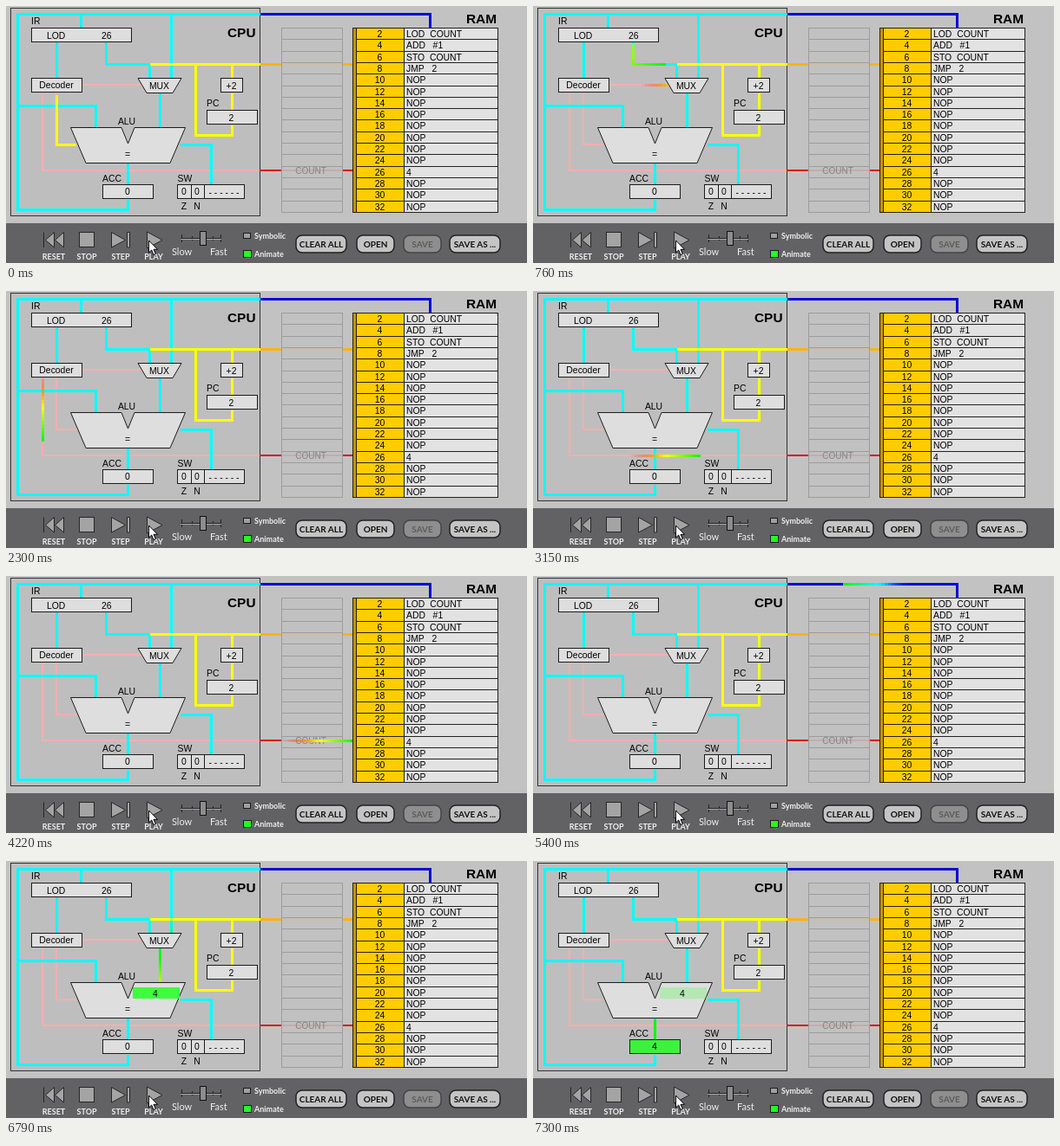
These frames come from a looping animation (600 by 297 pixels, 7.66 s). An HTML page:

```html
<!DOCTYPE html>
<html lang="en">
<head>
<meta charset="utf-8">
<title>CPU simulator</title>
<style>
html, body { margin: 0; width: 100%; height: 100%; overflow: hidden; background: #c2c2c2; }
svg { display: block; width: 600px; height: 297px; font: 10.4px "Liberation Sans", Arial, sans-serif; }
.crisp, .wire, .pulse { shape-rendering: crispEdges; }
.wire, .pulse { fill: none; stroke-width: 3; transform: translate(.5px, .5px); }
.thin { stroke-width: 2; transform: none; }
.box { fill: #dedede; stroke: #1c1c1c; }
.mid { text-anchor: middle; }
.big { font-weight: bold; font-size: 15.4px; }
.dashes { letter-spacing: 2.8px; }
.ui { font-family: Lato, sans-serif; fill: #eee; }
.speed { font-size: 11px; }
.cap { font-size: 9px; font-weight: bold; }
.icon { fill: #a4a4a4; stroke: #262626; }
</style>
</head>
<body>
<svg viewBox="0 0 600 297">
  <rect width="600" height="297" fill="#c2c2c2"/>
  <g class="crisp">
    <rect x="5.5" y="2.5" width="287" height="240" fill="#bebebe" stroke="#333"/>
  </g>
  <g id="wires"></g>
  <g id="ports" class="crisp"></g>
  <text class="mid" x="351" y="194" fill="#858585" font-size="10">COUNT</text>
  <g id="pulses"></g>

  <g id="boxes" class="crisp"></g>
  <path class="box" d="M152 83.5H202L192 100.5H162Z"/>
  <path class="box" d="M74.5 140.5H133L140.5 159L148 140.5H206.5L189 181.5H92Z"/>
  <g id="sum">
    <rect id="glow" x="146" y="146" width="54" height="13" fill="#3f3"/>
    <text class="mid" x="172" y="157">4</text>
  </g>
  <g id="labels"></g>
  <text id="acc" class="mid" x="140" y="218">0</text>
  <g id="ram"></g>

  <rect class="crisp" y="251" width="600" height="46" fill="#626264"/>
  <g class="icon">
    <path d="M43.5 261.500V279M55.500 261.500V279L45.500 270.500ZM66.500 261.500V279L56.500 270.500Z"/>
    <rect x="84.500" y="261.500" width="17" height="17"/>
    <path d="M121.500 261.500V279L137.500 270.500ZM139.500 261.500H142.500V279H139.500Z"/>
    <path d="M162.500 261V280L180 270.500Z"/>
  </g>
  <g class="crisp">
    <path d="M201 268.500H248M202.500 264V273M214.500 266V271M238.500 266V271M247.500 264V273" stroke="#222"/>
    <path d="M201 269.500H248" stroke="#aaa"/>
    <rect x="223.500" y="260.500" width="7" height="16" fill="#8c8c8c" stroke="#111"/>
    <rect x="273.500" y="262.500" width="8" height="6" fill="#a0a0a0" stroke="#1c1c1c"/>
    <rect x="273.500" y="282.500" width="9" height="8" fill="#2f2" stroke="#1c1c1c"/>
  </g>
  <g id="controls"></g>
  <path d="M164.500 271V285L167.700 282L170 287.500L172.400 286.500L170 281.300H174.500Z" fill="#fff" stroke="#000"/>
</svg>

<script>
const LOOP = 7660, TAIL = 80, SLICES = 20;
const $ = id => document.getElementById(id);
const add = (id, markup) => $(id).insertAdjacentHTML('beforeend', markup);
const text = (x, y, s, cls = '') => `<text class="${cls}" x="${x}" y="${y}">${s}</text>`;
const rect = (x, y, w, h, attrs) =>
  `<rect x="${x + .5}" y="${y + .5}" width="${w}" height="${h}" ${attrs}/>`;

const wires = [
  ['#f9aeae', 'M87 91H157M42 99V190H292M58 99V160H82', 'thin'],
  ['#0ff', 'M292 9H13V235H140V223M13 115H103V140M86 9V25M190 9V83M58 41V83' +
          'M115 41V67H165V83M177 100V140M140 181V206M200 160H236V206'],
  ['#ff0', 'M165 67H292M218 67V149H260V137M260 120V100M260 83V67'],
  ['#fcb312', 'M292 67H400'],
  ['#0808d8', 'M292 9H488V25'],
  ['#d80c1c', 'M292 190H400', 'thin']
];
for (const [color, d, cls = ''] of wires)
  add('wires', `<path class="wire ${cls}" d="${d}" stroke="${color}"/>`);

// Memory rows and the symbol column beside them
const gap = '&#160;&#160;';
const code = [`LOD${gap}COUNT`, `ADD${gap}&#160;#1`, `STO${gap}COUNT`, `JMP${gap}&#160;2`];
add('ram', '<rect class="crisp" x="399.500" y="25.500" width="4" height="213" fill="#c79400" stroke="#2a2000"/>');
for (let i = 0; i < 16; i++) {
  const y = Math.round(25 + i * 13.3), h = Math.round(38.3 + i * 13.3) - y;
  add('ports', rect(317, y, 70, h, 'fill="#c2c2c2" fill-opacity=".88" stroke="#9c9c9c"'));
  add('ram', `<g class="crisp">${rect(403, y, 55, h, 'fill="#fc0" stroke="#2a2000"')}` +
    `${rect(458, y, 108, h, 'fill="#e2e2e2" stroke="#222"')}</g>` +
    text(430.5, y + 11, 2 * i + 2, 'mid') +
    text(461, y + 11, code[i] || (i === 12 ? '4' : 'NOP')));
}

const boxes = [[29, 25, 115, 16], [29, 83, 58, 16], [247, 83, 25, 16], [231, 120, 58, 16],
  [111, 206, 58, 16], [197, 206, 16, 16], [213, 206, 15, 16], [228, 206, 46, 16]];
boxes.forEach((b, i) => add('boxes', rect(...b, `class="box" ${i === 4 ? 'id="accBox"' : ''}`)));

add('labels', [
  [29, 21, 'IR'], [47, 37.5, 'LOD'], [110, 37.5, '26'], [58, 95, 'Decoder', 'mid'],
  [176.5, 95.5, 'MUX', 'mid'], [259.5, 95.5, '+2', 'mid'], [231, 116, 'PC'], [259.5, 132.5, '2', 'mid'],
  [139, 136.5, 'ALU', 'mid'], [140, 175, '=', 'mid'], [111, 203, 'ACC'], [197.5, 203, 'SW'],
  [205, 218, '0', 'mid'], [220, 218, '0', 'mid'], [252.4, 218.5, '------', 'mid dashes'],
  [205, 235, 'Z', 'mid'], [220, 235, 'N', 'mid'],
  [255, 36, 'CPU', 'big'], [530, 20, 'RAM', 'big']
].map(a => text(...a)).join(''));

add('controls', [[55, 292.5, 'RESET'], [93, 292.5, 'STOP'], [132, 292.5, 'STEP'], [170, 292.5, 'PLAY']]
  .map(a => text(...a, 'ui cap mid')).join('') +
  text(191, 288, 'Slow', 'ui speed') + text(235, 288, 'Fast', 'ui speed') +
  '<g font-size="9" font-weight="bold">' + text(286, 269, 'Symbolic', 'ui') + text(286, 290, 'Animate', 'ui') + '</g>');
[[334, 58, 'CLEAR ALL'], [404, 43, 'OPEN'], [458, 43, 'SAVE', 1], [511, 58, 'SAVE AS ...']].forEach(([x, w, s, off]) =>
  add('controls', `<rect x="${x}" y="265" width="${w}" height="20" rx="7" stroke-width="1.500"
    fill="${off ? '#8e8e8e' : '#c4c4c4'}" stroke="${off ? '#444' : '#222'}"/>
    <text x="${x + w / 2}" y="278.500" class="ui mid" font-size="10" font-weight="bold"
    style="fill:${off ? '#5c5c5c' : '#111'}">${s}</text>`));

// Signals: path, [tail hue, head hue], [time, head distance] keys, one flat colour or not
const signals = [
  ['M58 99V160H80', [60, 60], [[0, 83], [210, 83], [580, 163]], true],
  ['M87 91H157', [0, 120], [[210, 0], [540, 70], [915, 150]]],
  ['M115 42V67H400', [60, 120], [[470, 0], [1540, 228], [1925, 310], [2300, 390]]],
  ['M42 100V190H400', [0, 120], [[1925, 0], [3150, 240], [4200, 448], [4270, 448], [4645, 528]]],
  ['M488 24V9H292', [240, 120], [[4715, 0], [5400, 146], [5706, 211], [6080, 291]]],
  ['M292 9H190V83', [180, 60], [[5706, 0], [6180, 102], [6527, 176], [6903, 256]]],
  ['M177 100V140', [180, 60], [[6550, 0], [6740, 40], [7115, 120]]],
  ['M140 182V206', [120, 120], [[7050, 0], [7165, 24], [LOOP, 24]], true]
].map(([d, [tail, head], keys, flat]) => {
  const slices = Array.from({ length: flat ? 1 : SLICES }, (_, i) => {
    const u = (i + .5) / SLICES;
    const p = document.createElementNS('http://www.w3.org/2000/svg', 'path');
    p.setAttribute('d', d);
    p.setAttribute('class', 'pulse');
    p.setAttribute('stroke', `hsl(${tail + (head - tail) * u},100%,50%)`);
    p.setAttribute('stroke-opacity', flat ? 1 : Math.min(1, u * 2.5));
    $('pulses').append(p);
    return p;
  });
  return { keys, slices, length: slices[0].getTotalLength() };
});

function valueAt(keys, t) {
  const i = keys.findIndex(k => k[0] > t);
  if (i < 1) return null;
  const [t0, a] = keys[i - 1], [t1, b] = keys[i];
  return a + (b - a) * (t - t0) / (t1 - t0);
}

function drawSignal({ keys, slices, length }, t) {
  const head = valueAt(keys, t), step = TAIL / slices.length;
  slices.forEach((p, i) => {
    const from = Math.max(0, head - TAIL + i * step);
    const to = Math.min(length, head - TAIL + (i + 1) * step);
    const on = head !== null && to > from;
    p.style.display = on ? '' : 'none';
    if (on) p.setAttribute('stroke-dasharray', `0 ${from} ${to - from} 9999`);
  });
}

const start = performance.now();
function frame() {
  const t = Math.max(0, performance.now() - start) % LOOP;
  signals.forEach(s => drawSignal(s, t));
  const loaded = t >= 7300;
  $('sum').style.display = t >= 6740 ? '' : 'none';
  $('glow').setAttribute('opacity', Math.max(.25, 1 - (t - 6740) / 750));
  $('acc').textContent = loaded ? '4' : '0';
  $('accBox').style.fill = loaded ? '#3cf23c' : '';
  requestAnimationFrame(frame);
}
frame();
</script>
</body>
</html>
```
